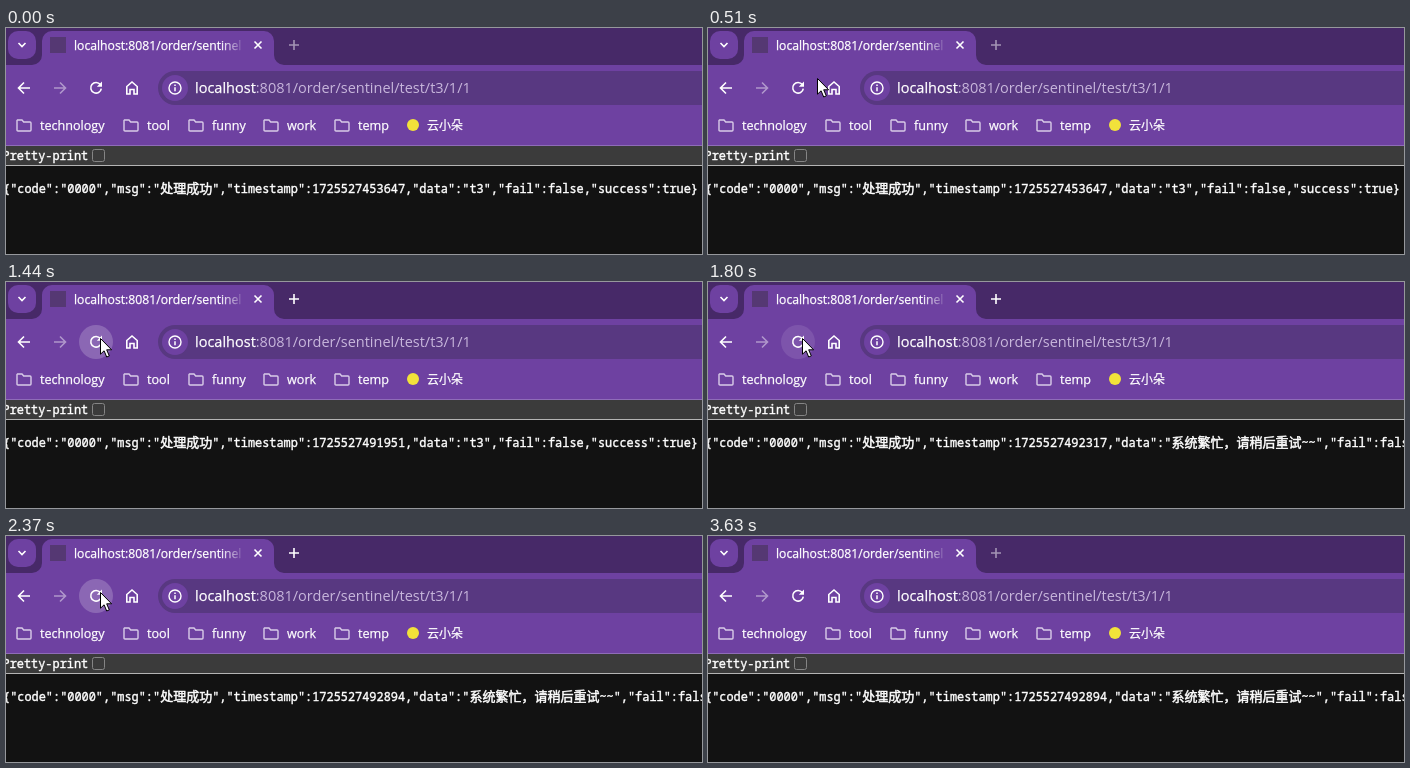
Write an HTML page that moves like this. It is 696 px wide and 226 px high and loops after 3720 ms.

```html
<!DOCTYPE html>
<html lang="zh">
<head>
<meta charset="utf-8">
<title>Sentinel flow control</title>
<style>
  html, body { margin: 0; width: 100%; height: 100%; overflow: hidden; background: #121212; }
  svg { display: block; }
  text { fill: #fff; stroke: #fff; stroke-width: .25; white-space: pre; }
  .ui { font-family: "Open Sans", "Noto Sans CJK SC", "Noto Sans CJK", sans-serif; }
  .mono { font: 11.91px "Noto Sans Mono", monospace; stroke-width: .4; }
  .cjk { font: 13px "Noto Sans CJK SC", "Noto Sans CJK", sans-serif; stroke-width: .5; }
  .faded { fill: url(#fade); stroke: url(#fade); }
  .dim { fill: #c8b7dc; stroke: none; }
  .icon { fill: none; stroke: #fff; stroke-width: 1.6; }
</style>
</head>
<body>
<svg width="696" height="226" viewBox="0 0 696 226">
  <defs>
    <linearGradient id="fade" gradientUnits="userSpaceOnUse" x1="214" x2="238" y1="0" y2="0">
      <stop offset="0" stop-color="#fff"/>
      <stop offset="1" stop-color="#fff" stop-opacity="0"/>
    </linearGradient>
  </defs>

  <!-- tab strip -->
  <rect width="696" height="38" fill="#472968"/>
  <rect x="2" y="3" width="28" height="28" rx="10" fill="#6e41a1"/>
  <path class="icon" d="M12.500 15l3.500 3.500 3.500-3.500"/>
  <path d="M26 37A10 10 0 0 0 36 27V13A10 10 0 0 1 46 3H258A10 10 0 0 1 268 13V27A10 10 0 0 0 278 37Z" fill="#6e41a1"/>
  <rect x="44" y="9" width="16" height="16" fill="#553873"/>
  <text class="ui faded" x="68" y="21.5" font-size="12.2">localhost:8081/order/sentinel</text>
  <path class="icon" d="M248.500 13.500l7 7m0-7l-7 7"/>
  <path id="plus" class="icon" d="M283 17h10M288 12v10"/>

  <!-- toolbar -->
  <rect y="37" width="696" height="81" fill="#6e41a1"/>
  <circle id="hover" cx="90" cy="60" r="17" fill="#fff"/>
  <path class="icon" d="M24 60H13M18 54.500l-5.500 5.500 5.500 5.500"/>
  <path class="icon" opacity=".45" d="M48 60h11M54 54.500l5.500 5.500-5.500 5.500"/>
  <path class="icon" d="M94.300 56.600A5.300 5.300 0 1 0 95.300 60.600"/>
  <path d="M96 53.500v5.200h-5.200z" fill="#fff"/>
  <path class="icon" d="M120.800 58.500L126 54l5.200 4.500V66H128V61.500H124V66H120.800Z"/>
  <rect x="152" y="43" width="580" height="34" rx="17" fill="#583881"/>
  <circle cx="169" cy="60" r="13" fill="#6e41a1"/>
  <circle class="icon" cx="169" cy="60" r="6" style="stroke-width:1.4"/>
  <path class="icon" d="M169 59.300v4M169 56.500v1.500" style="stroke-width:1.5"/>
  <text class="ui" x="189" y="65" font-size="14.5">localhost<tspan class="dim">:8081/order/sentinel/test/t3/1/1</tspan></text>
  <g id="bookmarks" class="ui" font-size="12.6"></g>
  <circle cx="407" cy="97" r="6" fill="#f2e23a"/>
  <text class="ui" x="421" y="102" font-size="12">云小朵</text>

  <!-- page -->
  <rect y="117" width="696" height="1" fill="#8f6cb8"/>
  <rect y="118" width="696" height="19" fill="#3b3b3b"/>
  <rect y="137" width="696" height="1" fill="#b4b4b4"/>
  <rect y="138" width="696" height="88" fill="#121212"/>
  <text class="mono" x="-3.5" y="132">Pretty-print</text>
  <rect x="86.500" y="121.500" width="12" height="12" rx="2" fill="#3b3b3b" stroke="#858585"/>
  <text class="mono" x="-3" y="165">{"code":"0000","msg":"<tspan class="cjk">处理成功</tspan>","timestamp":<tspan id="stamp"></tspan>,"data":"<tspan id="data"></tspan>","fail":false,"success":true}</text>

  <path id="cursor" d="M.5 .5V16.200L4.100 12.800 6.700 19 9.300 17.900 6.700 11.800H11.600Z" fill="#fff" stroke="#000"/>
</svg>
<script>
const LOOP = 3720, STEP = 30;
const $ = id => document.getElementById(id);

$("bookmarks").innerHTML = [[10, "technology"], [117, "tool"], [182, "funny"], [257, "work"], [328, "temp"]]
  .map(([x, label]) => `<path transform="translate(${x} 91)" fill="none" stroke="#d9cce8" stroke-width="1.4"
    d="M1.500 1H6l1.700 2H14Q15 3 15 4V11Q15 12 14 12H2Q1 12 1 11V1.500Z"/>
    <text x="${x + 24}" y="102">${label}</text>`).join("");

// Each key is [time, ...values].
const path = [
  [30, 675, 27], [90, 480, 32], [150, 335, 39], [210, 240, 45], [270, 181, 48],
  [360, 145, 49], [450, 120, 50], [540, 104, 50], [600, 94, 56],
  [2970, 94, 56], [3000, 112, 57], [3060, 350, 68], [3120, 646, 84],
  [3180, 676, 100], [3240, 688, 118]
];
const glow = [
  [570, 0], [720, .2], [1740, .2], [1770, .1], [1860, .1], [2040, .2],
  [3000, .2], [3120, .08], [3330, 0]
];
const busy = "系统繁忙，请稍后重试";
const replies = [
  [0, "1725527453647", "t3"], [810, "1725527491341", "t3"], [1410, "1725527491951", "t3"],
  [1770, "1725527492317", busy], [2340, "1725527492894", busy]
];

function sample(keys, t) {
  const next = keys.findIndex(key => key[0] > t);
  if (next === 0) return keys[0].slice(1);
  if (next < 0) return keys[keys.length - 1].slice(1);
  const a = keys[next - 1], b = keys[next];
  const p = (t - a[0]) / (b[0] - a[0]);
  return a.slice(1).map((v, i) => v + (b[i + 1] - v) * p);
}

let shown;
function showReply(reply) {
  if (reply === shown) return;
  shown = reply;
  const [, stamp, data] = reply;
  $("stamp").textContent = stamp;
  $("data").innerHTML = data === busy ? `<tspan class="cjk">${data}</tspan>~~` : data;
}

function render(now) {
  const t = Math.floor((now % LOOP) / STEP) * STEP;
  const [x, y] = sample(path, t).map(Math.round);
  $("cursor").setAttribute("transform", `translate(${x} ${y})`);
  $("cursor").setAttribute("visibility", t >= 30 && t < 3300 ? "visible" : "hidden");
  $("hover").setAttribute("opacity", sample(glow, t)[0]);
  $("plus").setAttribute("opacity", t >= 690 && t < 3630 ? 1 : .5);
  showReply(replies.filter(r => r[0] <= t).pop());
}

const start = performance.now();
function tick() {
  render(performance.now() - start);
  requestAnimationFrame(tick);
}
tick();
</script>
</body>
</html>
```
